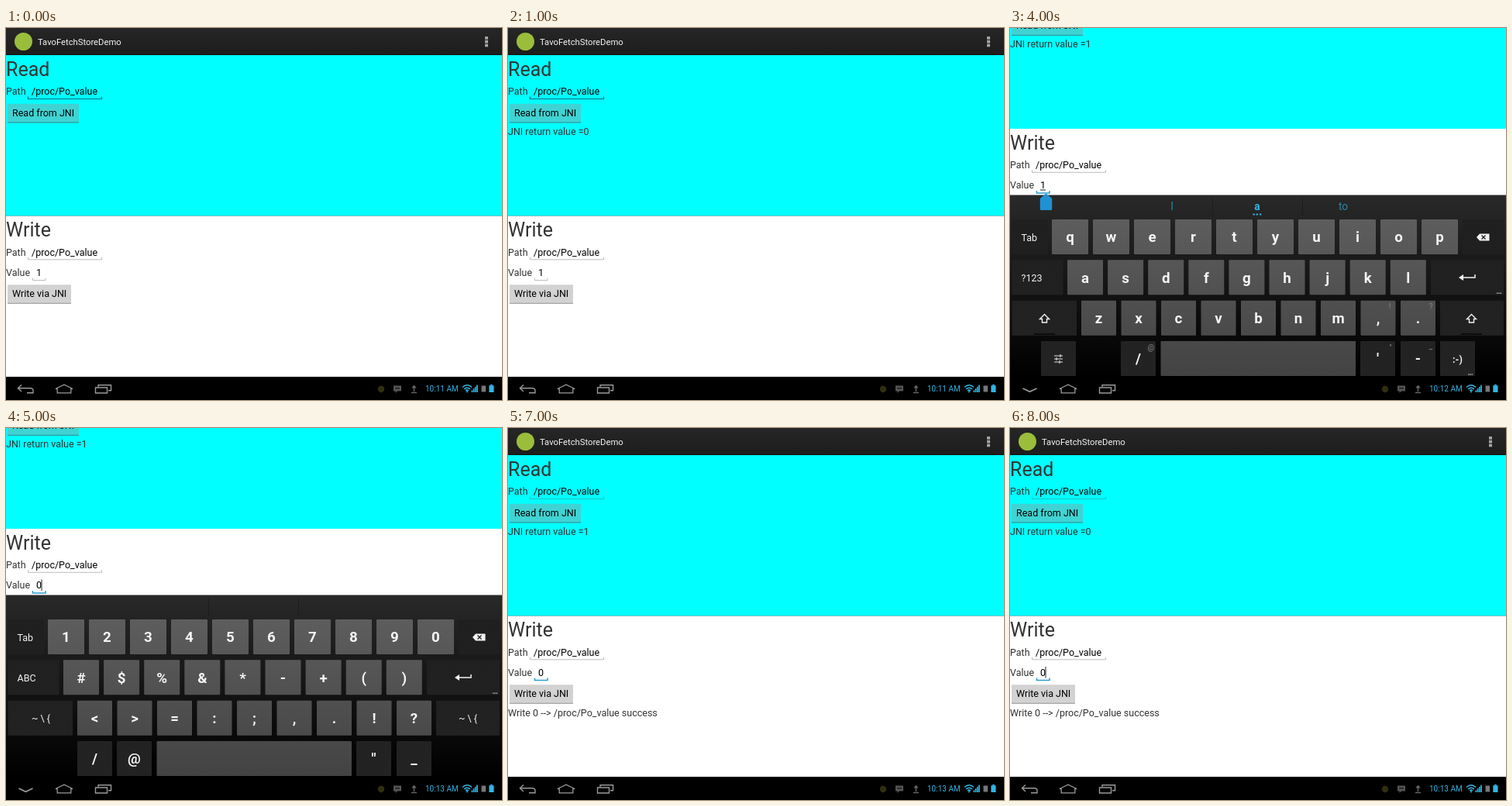
Recreate the animation shown at these times as an HTML page. Size 640x480 px, loop 9 s.

```html
<!DOCTYPE html>
<html lang="en">
<head>
<meta charset="utf-8">
<title>Read and write demo</title>
<style>
html, body { margin: 0; width: 100%; height: 100%; overflow: hidden; background: #000; }
svg { display: block; width: 640px; height: 480px; font-family: Roboto, sans-serif; }
text { white-space: pre; }
</style>
</head>
<body>
<svg id="stage" viewBox="0 0 640 480">
  <defs>
    <linearGradient id="bar" x2="0" y2="1"><stop stop-color="#262626"/><stop offset="1" stop-color="#1d1d1d"/></linearGradient>
    <linearGradient id="board" x2="0" y2="1"><stop stop-color="#292929"/><stop offset=".5" stop-color="#141414"/><stop offset="1" stop-color="#000"/></linearGradient>
    <linearGradient id="light" gradientUnits="userSpaceOnUse" x1="0" y1="247" x2="0" y2="450"><stop stop-color="#5d5d5d"/><stop offset="1" stop-color="#434343"/></linearGradient>
    <linearGradient id="dark" gradientUnits="userSpaceOnUse" x1="0" y1="247" x2="0" y2="450"><stop stop-color="#1f1f1f"/><stop offset="1" stop-color="#232323"/></linearGradient>
  </defs>
  <g id="page"></g>
  <g id="keyboard"></g>
  <g id="system"></g>
</svg>
<script>
const NS = 'http://www.w3.org/2000/svg';
const BLUE = '#33b5e5';
const byId = id => document.getElementById(id);

function add(parent, tag, attrs, content = '') {
  const node = document.createElementNS(NS, tag);
  for (const name in attrs) node.setAttribute(name, attrs[name]);
  node.textContent = content;
  parent.appendChild(node);
  return node;
}
const rect = (p, x, y, width, height, fill, rx = 0) => add(p, 'rect', { x, y, width, height, fill, rx });
const path = (p, d, stroke, width = 1, fill = 'none') =>
  add(p, 'path', { d, stroke, 'stroke-width': width, fill });
const label = (p, x, y, content, size = 12.5, fill = '#333', more = {}) =>
  add(p, 'text', { x, y, 'font-size': size, fill, ...more }, content);
const centred = (p, x, y, content, size, fill, weight = 400) =>
  label(p, x, y, content, size, fill, { 'text-anchor': 'middle', 'font-weight': weight });
const show = (node, visible) => node.setAttribute('display', visible ? 'inline' : 'none');

function button(p, y, width, content, fill, edge) {
  rect(p, 2, y, width, 24.5, fill, 1);
  rect(p, 2, y + 23.5, width, 1.2, edge);
  label(p, 8, y + 16, content, 12.5, '#000');
}
const underline = (p, x1, x2, y, stroke, width = 1) =>
  path(p, `M${x1} ${y - 3}V${y}H${x2}V${y - 3}`, stroke, width);

// Scrolling app page
const page = byId('page');
rect(page, 0, 35, 640, 207.5, '#0ff');
rect(page, 0, 242.5, 640, 208, '#fff');
rect(page, 0, 0, 640, 35, 'url(#bar)');
rect(page, 0, 34, 640, 1, '#141414');
add(page, 'circle', { cx: 22.5, cy: 17.5, r: 11.5, fill: '#9bbd3c' });
label(page, 41, 22, 'TavoFetchStoreDemo', 11.25, '#f3f3f3');
for (const y of [11, 15.8, 20.6]) rect(page, 618, y, 4, 3.7, '#a4a4a4');

label(page, 0, 61.5, 'Read', 25);
label(page, 0, 86, 'Path');
label(page, 33, 86, '/proc/Po_value', 12.5, '#000');
const pathIdle = underline(page, 28.5, 123.5, 91.5, '#20c4c4');
const pathFocus = underline(page, 28.5, 123.5, 91.5, '#176f82', 1.2);
button(page, 97.8, 92, 'Read from JNI', '#40d3d3', '#2a9d9d');
const readResult = label(page, 0, 137.5, '');

label(page, 0, 269, 'Write', 25);
label(page, 0, 293.5, 'Path');
label(page, 33, 293.5, '/proc/Po_value', 12.5, '#000');
underline(page, 28.5, 123.5, 298.8, '#bcbcbc');
label(page, 0, 319.7, 'Value');
const value = label(page, 39, 319.7, '', 12.5, '#000');
const valueIdle = underline(page, 34.5, 51, 325.5, '#bcbcbc');
const valueFocus = underline(page, 34.5, 51, 325.5, '#2a9fd0', 1.5);
const composing = rect(page, 39, 321, 7, 1, '#222');
const caret = rect(page, 45.5, 308, 1, 14.5, '#222');
button(page, 331.2, 82, 'Write via JNI', '#d2d2d2', '#a3a3a3');
const writeResult = label(page, 0, 371.5, '');

// On-screen keyboard
const keyboard = byId('keyboard');
rect(keyboard, 0, 215.5, 640, 235, 'url(#board)');
for (const x of [261, 377]) rect(keyboard, x, 219, 1, 24, '#1d1d1d');

const key = (p, x, y, width, tone) => rect(p, x, y, width, 45, `url(#${tone})`, 1);
const ellipsis = (p, x, y, fill = '#bbb') => {
  for (let i = 0; i < 3; i++) rect(p, x + i * 2.3, y, 1.4, 1.4, fill);
};

const rows = [
  { x: 54, y: 247, pitch: 53, width: 47, letters: 'qwertyuiop', symbols: '1234567890' },
  { x: 74, y: 299.3, pitch: 52.1, width: 46, letters: 'asdfghjkl', symbols: '#$%&*-+()' },
  { x: 92, y: 351.8, pitch: 51.5, width: 45, letters: 'zxcvbnm,.', symbols: '<>=:;,.!?' }
];
const bottomY = 404;

key(keyboard, 2.5, 247, 46.5, 'dark');
key(keyboard, 584, 247, 53, 'dark');
key(keyboard, 2.5, 299.3, 66, 'dark');
key(keyboard, 543, 299.3, 94, 'dark');
key(keyboard, 2.5, 351.8, 83.5, 'dark');
key(keyboard, 555, 351.8, 82, 'dark');
for (const r of rows)
  [...r.letters].forEach((_, i) => key(keyboard, r.x + i * r.pitch, r.y, r.width, 'light'));
key(keyboard, 194.5, bottomY, 251.5, 'light');
for (const x of [143, 452, 504]) key(keyboard, x, bottomY, 45, 'dark');

label(keyboard, 14.5, 274.5, 'Tab', 12.5, '#f2f2f2');
path(keyboard, 'M602 270l4-4.5h12.5v9H606z', 'none', 0, '#f2f2f2');
path(keyboard, 'M608.5 267.5l5 5m0-5l-5 5', '#222', 1.4);
path(keyboard, 'M600 318v4H581', '#f2f2f2', 1.5);
path(keyboard, 'M579 322l6-4v8z', 'none', 0, '#f2f2f2');
ellipsis(keyboard, 628, 341.5);

function layer(name, bottom) {
  const g = add(keyboard, 'g', {});
  for (const r of rows)
    [...r[name]].forEach((c, i) =>
      centred(g, r.x + i * r.pitch + r.width / 2, r.y + 29.3, c, 18.75, '#f5f5f5', 700));
  for (const [c, x] of bottom) centred(g, x, bottomY + 29.3, c, 18.75, '#f5f5f5', 700);
  return g;
}

const letters = layer('letters', [['/', 165.5], ["'", 474.5], ['-', 526.5]]);
label(letters, 14.5, 326.7, '?123', 12.5, '#f2f2f2');
for (const x of [44.5, 595.5]) {
  path(letters, `M${x} 369.5l6 6h-3v4.5h-6v-4.5h-3z`, '#f2f2f2', 1.4);
  rect(letters, x - 13.5, 394, 27, 1.6, '#080808');
}
key(letters, 40, bottomY, 45, 'dark');
key(letters, 555, bottomY, 45, 'dark');
centred(letters, 577.5, 431.5, ':-)', 12.5, '#f2f2f2', 700);
ellipsis(letters, 591, 446.3);
path(letters, 'M57 423h11M57 427h11M57 431h11M65 421v4M60 425v4M64 429v4', '#e0e0e0', 1.1);
for (const [c, x, y] of [['@', 182, 416], ['!', 490, 363], ['?', 543, 363], ['"', 491, 416], ['_', 543, 414]])
  centred(letters, x, y, c, 10, '#888');
centred(letters, 209, 235, 'I', 13.75, '#2587aa');
centred(letters, 319, 235, 'a', 13.75, BLUE, 700);
centred(letters, 430, 235, 'to', 13.75, '#2587aa');
for (const x of [313.5, 317.7, 322]) rect(letters, x, 239.5, 2.4, 2, BLUE);
path(letters, 'M46.5 213.5l7.7 6.5v13.5q0 1.5-1.5 1.5h-12.4q-1.5 0-1.5-1.5V220z', 'none', 0, '#1f92d3');

const symbols = layer('symbols', [['/', 114.5], ['@', 165.5], ['"', 474.5], ['_', 526.5]]);
symbols.prepend(key(symbols, 92, bottomY, 45, 'dark'));
label(symbols, 14.5, 326.7, 'ABC', 12.5, '#f2f2f2');
for (const x of [45, 596]) centred(symbols, x, 379, '~ \\ {', 12.5, '#f2f2f2');

// System bar
const system = byId('system');
rect(system, 0, 450, 640, 30, '#000');
const back = path(system, 'M20 460.5l-4.5 4.2 4.5 4.2M16 464.7h15q4 0 4 3v3h-8', '#9a9a9a', 1.4);
const hide = path(system, 'M16.5 465l9 4.2 9-4.2', '#9a9a9a', 1.7);
path(system, 'M64 465.5l11-5.3 11 5.3h-2.2v5.3H66.2v-5.3z', '#9a9a9a', 1.3);
path(system, 'M115.5 464h15v7h-15zM119 463v-2.3h16.5v7H132', '#9a9a9a', 1.4);

add(system, 'circle', { cx: 484, cy: 466, r: 4.2, fill: '#30300e' });
path(system, 'M500 461.5h10v7h-5l-2.5 2.5v-2.5H500z', 'none', 0, '#555');
path(system, 'M502 464.8h6', '#111', 1.2);
path(system, 'M526.5 469v-6M523 470.5h7', '#666', 1.4);
path(system, 'M523.3 464.5l3.2-4 3.2 4z', 'none', 0, '#666');
const clock = label(system, 541, 469, '', 10, BLUE);
path(system, 'M589 463.5q6-5.5 12 0M591 466q4-3.6 8 0M593 468q2-1.8 4 0', BLUE, 1.5);
add(system, 'circle', { cx: 595, cy: 469.3, r: 1.1, fill: BLUE });
for (let i = 0; i < 4; i++) rect(system, 600.5 + i * 2.2, 467.5 - i * 2.3, 1.7, 2.5 + i * 2.3, BLUE);
rect(system, 613.5, 461.5, 5.5, 8, '#777');
rect(system, 623.3, 461.3, 6.2, 8.7, BLUE);
rect(system, 625, 460, 2.8, 1.5, BLUE);

// One state per second
const steps = [
  { minute: 11, value: 1 },
  { minute: 11, value: 1, read: 0 },
  { minute: 12, value: 1, read: 0, written: 1 },
  { minute: 12, value: 1, read: 1, written: 1 },
  { minute: 12, value: 1, read: 1, written: 1, focus: true, keys: 'letters' },
  { minute: 13, value: 0, read: 1, written: 1, focus: true, keys: 'symbols', caret: true },
  { minute: 13, value: 0, read: 1, written: 1, focus: true },
  { minute: 13, value: 0, read: 1, written: 0, focus: true },
  { minute: 13, value: 0, read: 0, written: 0, focus: true, caret: true }
];

function render(ms) {
  const s = steps[Math.floor(ms / 1000) % steps.length];
  page.setAttribute('transform', `translate(0 ${s.keys ? -112.5 : 0})`);
  clock.textContent = `10:${s.minute} AM`;
  value.textContent = s.value;
  readResult.textContent = s.read === undefined ? '' : `JNI return value =${s.read}`;
  writeResult.textContent = s.written === undefined ? '' : `Write ${s.written} --> /proc/Po_value success`;
  show(pathFocus, !s.focus);
  show(pathIdle, s.focus);
  show(valueFocus, s.focus);
  show(valueIdle, !s.focus);
  show(caret, s.caret);
  show(composing, s.keys === 'letters');
  show(keyboard, s.keys);
  show(letters, s.keys === 'letters');
  show(symbols, s.keys === 'symbols');
  show(back, !s.keys);
  show(hide, s.keys);
}

const start = performance.now();
function tick() {
  render(performance.now() - start);
  requestAnimationFrame(tick);
}
tick();
</script>
</body>
</html>
```
